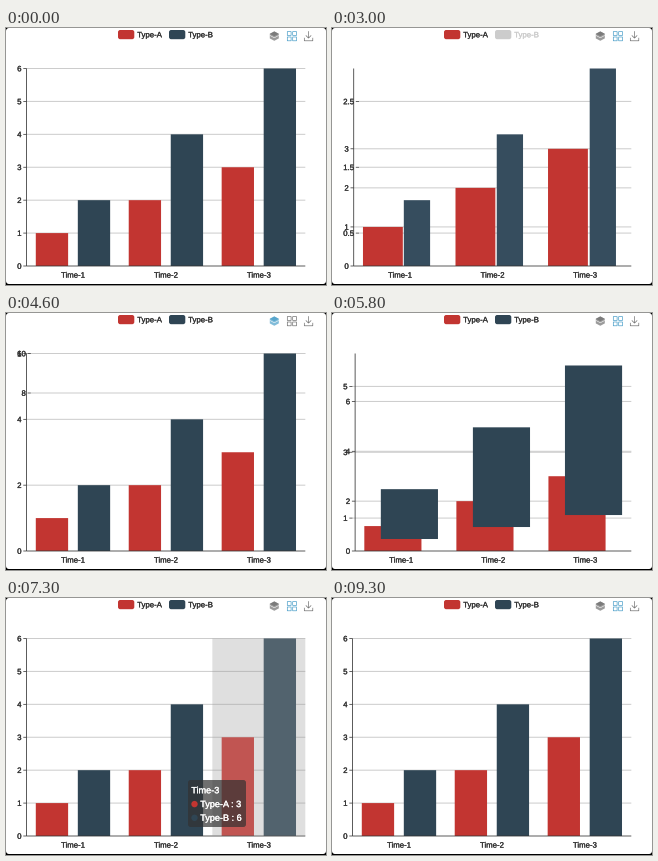
Write a matplotlib script that moves like this. It is 320 px wide and 257 px high and loops after 9700 ms.

```python
import matplotlib.pyplot as plt
from matplotlib.animation import FuncAnimation
from matplotlib.patches import Circle, FancyBboxPatch, Polygon, Rectangle
from matplotlib.patheffects import withStroke

W, H, DPI = 320, 257, 100
FRAMES, STEP = 97, 100
PX = 72 / DPI

TOP, BOTTOM, RIGHT = 40.5, 238, 299.3
DATA = {"A": (1, 2, 3), "B": (2, 4, 6)}
FILL = {"A": "#c23531", "B": "#2f4554"}
LIFT = {"A": "#d53a35", "B": "#364d5e"}
INK, GRID, GREY, BLUE, OFF = "#333333", "#cccccc", "#666666", "#3e98c5", "#cccccc"

# mode: axis x, axis maximum, tick step, visible series
MODES = {
    "both": (20.5, 6, 1, "AB"),
    "only_a": (27, 3, 0.5, "A"),
    "only_b": (20.5, 6, 1, "B"),
    "stack": (24.8, 10, 2, "AB"),
}
SWITCHES = [(-1000, "both"), (600, "only_b"), (1350, "both"), (2980, "only_a"),
            (3600, "both"), (4600, "stack"), (5754, "both")]
MORPH = 300

# pointer stops over the plot: time, x, y
STOPS = [(6400, 253, 62), (6600, 253, 110), (6900, 253, 169),
         (7400, 165, 150), (8000, 95, 140), (8200, 75, 150),
         (9000, 160, 120), (9100, 253, 90)]
TIP_END, TIP_W, TIP_H, TIP_GAP, TIP_MOVE = 9300, 58, 47, 13, 400

plt.rcParams["font.family"] = "Liberation Sans"
plt.rcParams["text.hinting"] = "none"
fig = plt.figure(figsize=(W / DPI, H / DPI), dpi=DPI, facecolor="black")
ax = fig.add_axes([0, 0, 1, 1])


def clamp(v):
    return max(0, min(1, v))


def ease_out(v, power=3):
    return 1 - (1 - clamp(v)) ** power


def mix(a, b, p):
    return a + (b - a) * p


def text(x, y, s, size=7.8, color=INK, ha="left", z=5, **kw):
    # a hairline stroke gives the slightly heavy look of browser text
    ax.text(x, y + size * 0.36, s, fontsize=size * PX, color=color,
            ha=ha, va="baseline", zorder=z,
            path_effects=[withStroke(linewidth=0.25 * PX, foreground=color)], **kw)


def line(xs, ys, color, z, width=1.0):
    ax.plot(xs, ys, color=color, lw=width * PX, zorder=z, snap=False,
            solid_capstyle="butt", solid_joinstyle="miter")


def rect(x, y, w, h, color, z, **kw):
    ax.add_patch(Rectangle((x, y), w, h, fc=color, ec="none", zorder=z,
                           snap=False, **kw))


def rounded(x, y, w, h, r, color, z, **kw):
    ax.add_patch(FancyBboxPatch((x, y), w, h, fc=color, ec="none", zorder=z,
                                boxstyle=f"round,pad=0,rounding_size={r}", **kw))


def y_at(value, top_value):
    return BOTTOM - (BOTTOM - TOP) * value / top_value


def bar(mode, series, i):
    """Rectangle of one bar as x, width, top, bottom."""
    left, top_value, _, shown = MODES[mode]
    band = (RIGHT - left) / 3
    x, w = left + band * (i + 0.1), band * 0.8
    low = 0
    if mode == "stack":
        low = DATA["A"][i] if series == "B" else 0
    elif len(shown) == 2:
        w /= 2.3
        if series == "B":
            x += 1.3 * w
    high = low + DATA[series][i]
    return x, w, y_at(high, top_value), y_at(low, top_value)


def folded(shape):
    return (shape[0], 0) + shape[2:]


def ticks(mode):
    _, top_value, step, _ = MODES[mode]
    n = round(top_value / step)
    return {k * step: y_at(k * step, top_value) for k in range(n + 1)}


def current(t):
    k = max(j for j, s in enumerate(SWITCHES) if s[0] <= t)
    start, new = SWITCHES[k]
    old = SWITCHES[max(k - 1, 0)][1]
    return old, new, ease_out((t - start) / MORPH)


def draw_axes(old, new, p):
    end = MODES[new][0]
    left = mix(MODES[old][0], end, p)
    before = ticks(old)
    for value, y in ticks(new).items():
        x = end
        if value in before:
            x, y = left, mix(before[value], y, p)
        if value:
            line([x, RIGHT], [y, y], GRID, 1)
        line([x - 3.2, x], [y, y], INK, 3, 0.75)
        text(x - 5, y, f"{value:g}", ha="right")
    line([left, left], [TOP, BOTTOM], INK, 3, 0.8)
    line([left, RIGHT], [BOTTOM, BOTTOM], INK, 3, 0.8)
    band = (RIGHT - left) / 3
    for i in range(3):
        text(left + band * (i + 0.5), 246.8, f"Time-{i + 1}", ha="center")


def draw_bars(old, new, p, t, hovered):
    lifted = {"A": 500 <= t < 1350, "B": 2000 <= t < 3500}
    for series in "AB":
        was, now = series in MODES[old][3], series in MODES[new][3]
        for i in range(3):
            if was:
                a = bar(old, series, i)
                b = bar(new, series, i) if now else folded(a)
            else:
                b = bar(new, series, i)
                a = folded(b)
            x, w, top, low = (mix(u, v, p) for u, v in zip(a, b))
            palette = LIFT if lifted[series] or i == hovered else FILL
            if w > 0.05:
                rect(x, top, w, low - top, palette[series], 2)


def draw_legend(shown):
    for series, x in (("A", 112), ("B", 163)):
        on = series in shown
        rounded(x, 2, 16.3, 9.2, 2.2, FILL[series] if on else OFF, 4)
        text(x + 19.2, 6.5, f"Type-{series}", color=INK if on else OFF)


def draw_tools(mode, t):
    over_stack = 4300 <= t < 4600
    over_tile = 5200 <= t < 5754
    stack = BLUE if mode == "stack" or over_stack else GREY
    tile = BLUE if mode != "stack" or over_tile else GREY

    # block of layers: hexagon body, darker lid, light seam
    x0, x1, x2 = 263.8, 268.3, 272.8
    body = [(x0, 5.8), (x1, 3.4), (x2, 5.8), (x2, 10.4), (x1, 12.8), (x0, 10.4)]
    lid = [(x0, 5.8), (x1, 3.4), (x2, 5.8), (x1, 8.2)]
    ax.add_patch(Polygon(body, fc=stack, ec="none", alpha=0.65, zorder=4))
    ax.add_patch(Polygon(lid, fc=stack, ec="none", alpha=0.6, zorder=5))
    line([x0, x1, x2], [7.4, 9.8, 7.4], "white", 6, 0.5)

    for x in (281.3, 286.7):
        for y in (3.6, 9):
            ax.add_patch(Rectangle((x, y), 3.8, 3.8, fc="none", ec=tile, snap=False,
                                   lw=0.65 * PX, zorder=4))
    line([302.5, 302.5], [3.2, 10], GREY, 4, 0.65)
    line([299.8, 302.5, 305.2], [7.4, 10.1, 7.4], GREY, 4, 0.65)
    line([298.3, 298.3, 306.8, 306.8], [9.8, 12.8, 12.8, 9.8], GREY, 4, 0.65)

    hint = dict(color=BLUE, ha="center", family="Noto Sans CJK JP")
    if over_stack:
        text(x1, 20.5, "切换为堆叠", **hint)
    if over_tile:
        text(286.2, 20.5, "切换为平铺", **hint)


def tip_goal(x, y):
    flip = x + TIP_GAP + TIP_W > W
    return (x - TIP_GAP - TIP_W if flip else x + TIP_GAP), y + TIP_GAP


def tip_at(t):
    """Tooltip corner: each pointer stop restarts an eased glide."""
    start, pos = STOPS[0][0], tip_goal(*STOPS[0][1:])
    goal = pos
    for when, x, y in STOPS[1:] + [(t + 1, 0, 0)]:
        p = ease_out((min(when, t) - start) / TIP_MOVE, 5)
        pos = tuple(mix(a, b, p) for a, b in zip(pos, goal))
        if when > t:
            return pos
        start, goal = when, tip_goal(x, y)


def hovered_band(t):
    if not STOPS[0][0] <= t < TIP_END:
        return None
    mouse_x = [s for s in STOPS if s[0] <= t][-1][1]
    left = MODES["both"][0]
    return int((mouse_x - left) / (RIGHT - left) * 3)


def draw_tip(t, i):
    left = MODES["both"][0]
    band = (RIGHT - left) / 3
    rect(left + band * i, TOP, band, BOTTOM - TOP, "#969696", 4, alpha=0.3)

    x, y = tip_at(t)
    rounded(x, y, TIP_W, TIP_H, 2.6, "#323232", 7, alpha=0.7)
    text(x + 3.3, y + 10, f"Time-{i + 1}", 9.1, "white", z=9)
    for k, series in enumerate("AB"):
        row = y + 23.8 + 13.7 * k
        ax.add_patch(Circle((x + 6.5, row + 0.3), 3.2, fc=FILL[series], ec="none", zorder=8))
        text(x + 12.2, row, f"Type-{series} : {DATA[series][i]}", 9.1, "white", z=9)


def draw(frame):
    t = frame * STEP
    ax.cla()
    ax.axis("off")
    ax.set_xlim(0, W)
    ax.set_ylim(H, 0)
    rounded(0, 0, W, 256, 3, "white", 0)
    old, new, p = current(t)
    hovered = hovered_band(t)
    draw_axes(old, new, p)
    draw_bars(old, new, p, t, hovered)
    draw_legend(MODES[new][3])
    draw_tools(new, t)
    if hovered is not None:
        draw_tip(t, hovered)
    return []


anim = FuncAnimation(fig, draw, frames=FRAMES, interval=STEP, repeat=True,
                     repeat_delay=0, blit=False)
plt.show()
```
